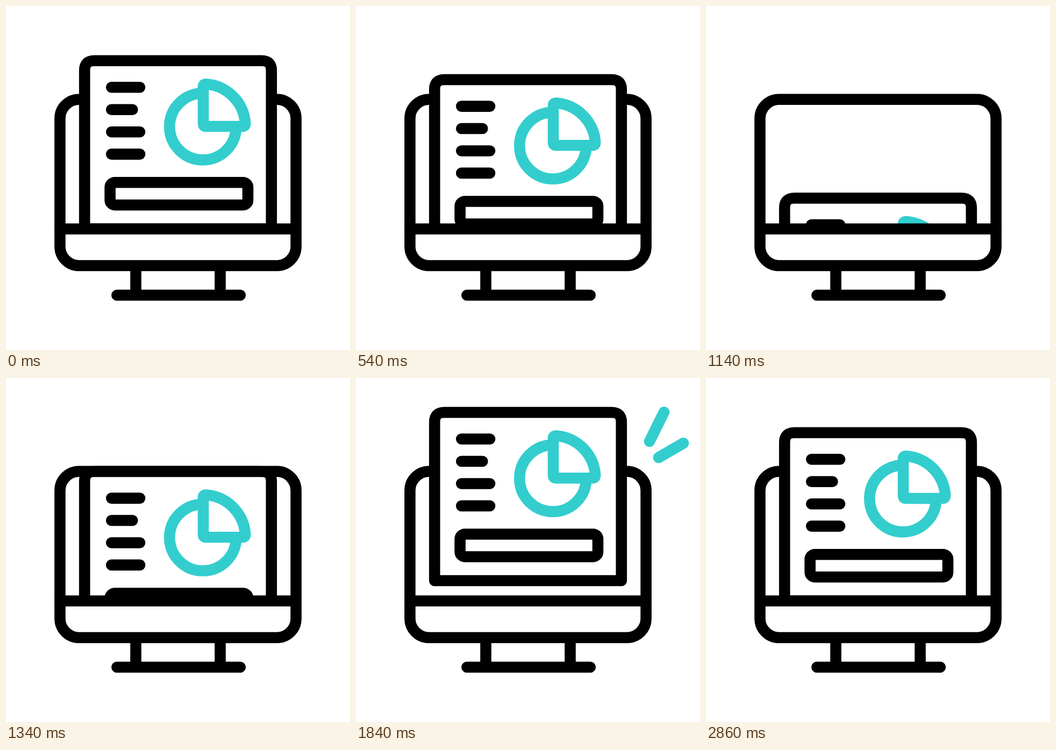
Animation of 640x640 px, one loop 3240 ms. Source, as an HTML page:

```html
<!DOCTYPE html>
<html lang="en">
<head>
<meta charset="utf-8">
<title>Report on screen</title>
<style>
html, body { margin: 0; width: 100%; height: 100%; overflow: hidden; background: #fff; }
svg { display: block; width: 100vw; height: 100vh; }
.ink, .hue { fill: none; stroke-width: 20.6; stroke-linecap: round; stroke-linejoin: round; }
.ink { stroke: #000; }
.hue { stroke: #33cdcd; }
</style>
</head>
<body>
<svg viewBox="0 0 640 640">
  <defs>
    <clipPath id="above"><rect width="640" height="416"/></clipPath>
    <path id="wedge" d="M372 224 Q367 224 367 219 V150 Q367 145 372.5 145.2 A79 79 0 0 1 445.2 218 Q445.5 224 440 224 Z"/>
  </defs>
  <rect width="640" height="640" fill="#fff"/>
  <g class="ink">
    <rect x="100.4" y="173.7" width="439.2" height="309.3" rx="35.5"/>
    <path d="M241.5 484V538M398.5 484V538M206.3 538H435.8"/>
  </g>
  <g clip-path="url(#above)">
    <g id="panel">
      <path class="ink" style="fill:#fff" d="M146.2 414.7V119.7Q146.2 101.7 164.2 101.7H475.8Q493.8 101.7 493.8 119.7V414.7Z"/>
      <rect class="ink" x="193.6" y="328.2" width="256.4" height="42" rx="9"/>
      <g id="rows"></g>
      <path class="hue" d="M366.5 162.4A62 62 0 1 0 428.3 224.5"/>
      <use href="#wedge" class="hue"/>
      <use href="#wedge" class="ink" id="sweep"/>
    </g>
  </g>
  <path class="ink" d="M100.4 414.7H539.6"/>
  <g id="rays"></g>
</svg>
<script>
const LOOP = 3240, STEP = 20;
const $ = id => document.getElementById(id);
const ramp = (t, a, b) => {
  const u = Math.min(1, Math.max(0, (t - a) / (b - a)));
  return u * u * (3 - 2 * u);
};

function add(parent, cls, d) {
  const el = document.createElementNS("http://www.w3.org/2000/svg", "path");
  el.setAttribute("class", cls);
  el.setAttribute("d", d);
  $(parent).append(el);
  return el;
}

// Panel top edge: time, position, speed (px per ms)
const keys = [
  [240, 91, 0], [420, 53, 0], [540, 126.3, 1.1], [790, 425, 0.6], [791, 425, 0],
  [1000, 425, 0], [1320, 176, -0.67], [1640, 76, -0.17], [1860, 53, 0], [2060, 91, 0]
];

function panelTop(t) {
  const i = keys.findIndex(k => t < k[0]);
  if (i < 1) return 91;
  const [t0, p0, v0] = keys[i - 1], [t1, p1, v1] = keys[i];
  const d = t1 - t0, u = (t - t0) / d, w = 1 - u;
  return p0 * w * w * (1 + 2 * u) + p1 * u * u * (3 - 2 * u)
       + d * u * w * (v0 * w - v1 * u);
}

// Text rows: y, right end, extra reach
const rows = [[151.3, 249, 22], [192.7, 235.3, 35], [234.2, 249, 28], [275.6, 249, 34]]
  .map(([y, end, reach]) => ({ y, end, reach, el: add("rows", "ink", "") }));

// Rays: path, start, growth time, delay of the tail
const rays = [
  ["M257.2 212.5V357", 756, 200, 150],
  ["M325.5 212L322.8 357", 720, 200, 135],
  ["M546 118L573 63.5", 1592, 250, 250],
  ["M563 148L609.5 121", 1642, 210, 200]
].map(([d, start, grow, lag]) => ({ start, grow, lag, el: add("rays", "hue", d) }));

function trim(el, len, a, b) {
  el.style.display = b - a < 0.005 ? "none" : "";
  el.style.strokeDasharray = `${(b - a) * len} ${2 * len}`;
  el.style.strokeDashoffset = -a * len;
}

const wedgeLen = $("wedge").getTotalLength();
for (const r of rays) r.len = r.el.getTotalLength();

function draw(t) {
  $("panel").setAttribute("transform", `translate(0 ${panelTop(t) - 91})`);
  const out = ramp(t, 2060, 2366), back = ramp(t, 2400, 2860);
  for (const r of rows) {
    r.el.setAttribute("d", `M196.2 ${r.y}H${r.end + r.reach * (out - back)}`);
  }
  trim($("sweep"), wedgeLen, back, out);
  for (const { el, len, start, grow, lag } of rays) {
    trim(el, len, ramp(t, start + lag, start + lag + grow), ramp(t, start, start + grow));
  }
}

const begin = performance.now();
function tick(now) {
  const t = Math.max(0, now - begin) % LOOP;
  draw(Math.floor(t / STEP) * STEP);
  requestAnimationFrame(tick);
}
draw(0);
requestAnimationFrame(tick);
</script>
</body>
</html>
```
